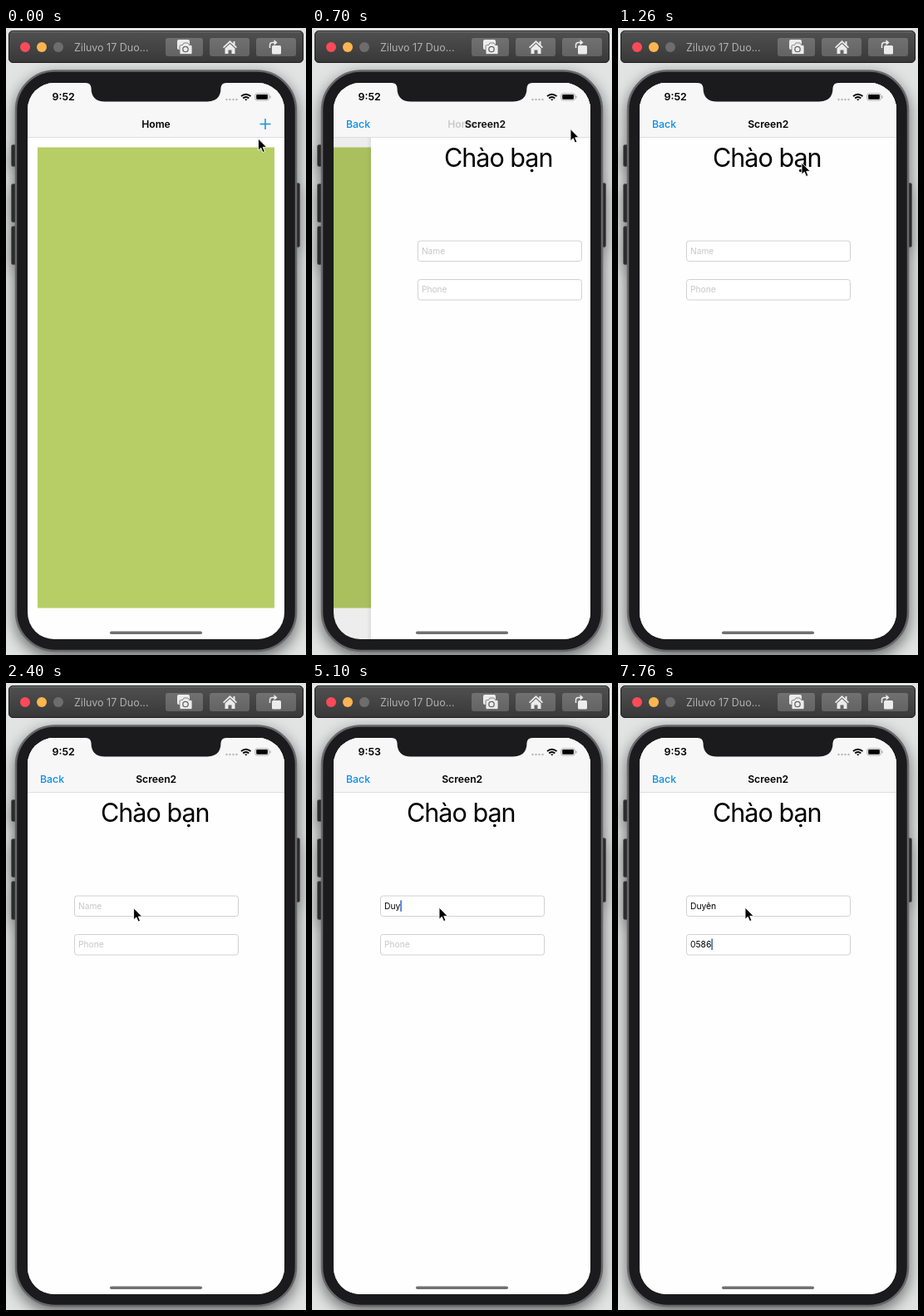
These frames come from a looping animation (361x754 px, 8000 ms). An HTML page:

```html
<!DOCTYPE html>
<html lang="vi">
<head>
<meta charset="utf-8">
<title>Screen push and form typing</title>
<style>
  html, body { margin: 0; width: 100%; height: 100%; overflow: hidden; background: #e2e4e4; }
  svg { display: block; width: 361px; height: 754px; font-family: Inter, Roboto, sans-serif; }
  .phone { filter: drop-shadow(0 6px 9px rgba(0, 0, 0, .55)); }
  .side { fill: #2b2b2d; stroke: #58585a; }
  .bar { font-size: 12.2px; font-weight: 600; }
  .back { font-size: 12.3px; font-weight: 500; fill: #0a8fea; }
  .hello { font-size: 30.5px; letter-spacing: -.032em; }
  .field { fill: #fff; stroke: #d0d0d0; }
  .input { font-size: 10.3px; }
  .hint { font-size: 10.2px; fill: #c6c6c8; }
  .icon { fill: #ececec; }
</style>
</head>
<body>
<svg viewBox="0 0 361 754">
  <defs>
    <linearGradient id="toolbar" x2="0" y2="1">
      <stop stop-color="#505050"/><stop offset="1" stop-color="#383838"/>
    </linearGradient>
    <linearGradient id="button" x2="0" y2="1">
      <stop stop-color="#717171"/><stop offset="1" stop-color="#636363"/>
    </linearGradient>
    <linearGradient id="edge">
      <stop stop-opacity="0"/><stop offset="1" stop-opacity=".07"/>
    </linearGradient>
    <clipPath id="screen"><rect x="26" y="66" width="309" height="669" rx="32"/></clipPath>
  </defs>

  <!-- phone body -->
  <g class="phone">
    <rect class="side" x="6.5" y="140.5" width="8" height="26" rx="2"/>
    <rect class="side" x="6.5" y="187.5" width="8" height="46" rx="2"/>
    <rect class="side" x="6.5" y="238.5" width="8" height="46" rx="2"/>
    <rect class="side" x="345.5" y="186.5" width="8" height="77" rx="2"/>
    <rect x="12" y="51.500" width="337" height="697.500" rx="47" fill="#1b1b1d" stroke="#68686a" stroke-width="2.500"/>
  </g>

  <!-- simulator toolbar -->
  <rect x="3.500" y="3.500" width="354" height="38" rx="4.500" fill="url(#toolbar)" stroke="#1c1c1c"/>
  <path d="M7 4.500H354" stroke="#777"/>
  <circle cx="23" cy="23" r="6" fill="#fd4a58"/>
  <circle cx="43" cy="23" r="6" fill="#fdb550"/>
  <circle cx="63" cy="23" r="6" fill="#6d6d6d"/>
  <text x="82" y="27.500" font-size="12.5" fill="#b0b0b0">Ziluvo 17 Duo...</text>
  <g fill="url(#button)">
    <rect x="192" y="12" width="45" height="22" rx="3"/>
    <rect x="245" y="12" width="48" height="22" rx="3"/>
    <rect x="301" y="12" width="48" height="22" rx="3"/>
  </g>
  <g class="icon">
    <rect x="206" y="14" width="15" height="12" rx="2"/>
    <path d="M210.500 20.500h2l1.500-2.500h5l1.500 2.500h2q1.500 0 1.500 1.500v8q0 1.500-1.500 1.500h-12q-1.500 0-1.500-1.500v-8q0-1.500 1.500-1.500z" stroke="#6a6a6a" stroke-width=".8"/>
    <circle cx="216" cy="25.500" r="3.200" fill="none" stroke="#666" stroke-width="1.300"/>
    <path d="M269.500 15L261 23l1.200 1.200 7.300-6.800 7.300 6.800L278 23l-2.500-2.400V16h-2v2.700z"/>
    <path d="M263.500 24.500l6-5.500 6 5.500V31h-4v-4.500h-4V31h-4z"/>
    <rect x="320" y="21" width="11" height="10.500" rx="1.500"/>
    <path d="M317.500 24v-3.500q0-3 3-3h3" fill="none" stroke="#ececec" stroke-width="1.500"/>
    <path d="M322.500 14l4 3.500-4 3.500z"/>
  </g>

  <!-- app -->
  <g clip-path="url(#screen)">
    <rect x="26" y="66" width="309" height="669" fill="#fefefe"/>
    <g id="home"><rect x="38" y="143.500" width="285" height="554" fill="#b6ce65"/></g>
    <rect id="dim" x="26" y="66" width="309" height="669"/>
    <g id="form">
      <rect x="21" y="66" width="5" height="669" fill="url(#edge)"/>
      <rect x="26" y="66" width="309" height="669" fill="#fefefe"/>
      <text class="hello" x="114" y="167">Chào bạn</text>
      <rect class="field" x="82.500" y="256" width="197" height="24.500" rx="3"/>
      <rect class="field" x="82.500" y="302.500" width="197" height="24.500" rx="3"/>
      <text class="hint" id="nameHint" x="87" y="272">Name</text>
      <text class="hint" id="phoneHint" x="87" y="318">Phone</text>
      <text class="input" id="name" x="87" y="272"></text>
      <text class="input" id="phone" x="87" y="318"></text>
      <rect id="caret" width="1.500" height="13.500" fill="#2f62cf"/>
    </g>
    <rect x="26" y="66" width="309" height="65" fill="#f7f7f7"/>
    <path d="M26 131.500H335" stroke="#dedede"/>
    <text class="bar" id="homeTitle" x="180.500" y="119.700" text-anchor="middle">Home</text>
    <text class="bar" id="formTitle" x="180.700" y="119.700" text-anchor="middle">Screen2</text>
    <text class="back" id="back" x="41" y="119.700">Back</text>
    <path id="plus" d="M305.500 115.500h13M312 109v13" stroke="#1592de" stroke-width="1.500"/>
    <text id="clock" x="55.500" y="87.300" font-size="12.4" font-weight="600"></text>
    <path d="M265.500 86h13" stroke="#b8b8ba" stroke-width="2.400" stroke-linecap="round" stroke-dasharray="0 4"/>
    <g fill="none" stroke="#000" stroke-width="1.900">
      <path d="M283 82q5.500-4.600 11.500 0M285.200 84.500q3.500-2.800 7.100 0"/>
      <path d="M287 85.500h3.600l-1.800 2z" fill="#000" stroke="none"/>
    </g>
    <rect x="299.800" y="78.800" width="16.500" height="8.200" rx="2.300" fill="none" stroke="#9a9a9a" stroke-width=".8"/>
    <rect x="301.200" y="80.100" width="13.700" height="5.600" rx="1.200"/>
    <path d="M318 81.500v3" stroke="#9a9a9a"/>
    <rect x="125" y="725.500" width="111" height="3.400" rx="1.700" fill="#707070"/>
  </g>
  <path d="M96 65H265V66Q259 66 258.500 72Q258.500 88.500 242 88.500H119Q102.500 88.500 102.500 72Q102 66 96 66z" fill="#1b1b1d"/>

  <path id="pointer" d="M0 0V14.200L3.300 11.200L5.500 16.500L7.900 15.500L5.700 10.300H10.200z" stroke="#fff" stroke-width=".9"/>
</svg>
<script>
  const LOOP = 8000;
  const WIDTH = 309;
  const PUSH_START = 505;
  const STIFFNESS = .0175;

  const pointerX = [[0, 303.5], [30, 304], [200, 311], [960, 311], [1060, 292], [1160, 258],
    [1260, 221], [1330, 192], [1500, 168], [1660, 157], [1830, 153], [2000, 153], [2160, 154], [2360, 154], [2460, 153]];
  const pointerY = [[0, 133], [30, 132], [200, 121.5], [960, 121.5], [1060, 131], [1160, 147],
    [1260, 162], [1330, 171], [1500, 222], [1660, 258], [1830, 271], [2160, 272], [2360, 271], [2460, 270]];
  const caretAlpha = [[2400, 0], [2430, 1], [3000, 1], [3230, 0], [3500, 0], [3660, 1], [4100, 1],
    [4330, 0], [4400, 0], [4430, 1], [6370, 1], [6530, 0], [6870, 0], [7030, 1]];
  const nameTyping = [[0, ''], [3660, 'd'], [4430, ''], [4700, 'D'], [4900, 'Du'], [5100, 'Duy'],
    [5300, 'Duye'], [5400, 'Duyê'], [5500, 'Duyên']];
  const phoneTyping = [[0, ''], [7030, '0'], [7200, '05'], [7460, '058'], [7760, '0586']];

  const el = id => document.getElementById(id);
  const clamp = v => Math.max(0, Math.min(1, v));
  const step = (list, t) => list.filter(([time]) => time <= t).pop()[1];
  const shift = (id, x, y = 0) => el(id).setAttribute('transform', `translate(${x} ${y})`);
  const fade = (id, alpha) => el(id).setAttribute('opacity', clamp(alpha));

  function track(points, t) {
    const next = points.findIndex(([time]) => time > t);
    if (next === 0) return points[0][1];
    if (next < 0) return points[points.length - 1][1];
    const [t0, a] = points[next - 1], [t1, b] = points[next];
    return a + (b - a) * (t - t0) / (t1 - t0);
  }

  // Critically damped spring, 0 to 1
  function pushProgress(t) {
    const s = Math.max(0, t - PUSH_START) * STIFFNESS;
    return 1 - (1 + s) * Math.exp(-s);
  }

  function drawPush(t) {
    const p = pushProgress(t);
    const rest = WIDTH * (1 - p);
    shift('home', -.3 * WIDTH * p);
    shift('form', p ? rest : WIDTH + 10);
    shift('formTitle', .62 * rest);
    fade('dim', .08 * p);
    fade('homeTitle', 1 - (p - .2) / .8);
    fade('formTitle', p ? p * 1.02 + .08 : 0);
    fade('back', (p - .1) / .7);
    fade('plus', t < 360 ? 1 : .35 - p * 1.2);
  }

  function drawForm(t) {
    const name = step(nameTyping, t), phone = step(phoneTyping, t);
    el('name').textContent = name;
    el('phone').textContent = phone;
    fade('nameHint', name ? 0 : 1);
    fade('phoneHint', phone ? 0 : 1);
    const onPhone = t >= 5800;
    const text = onPhone ? phone : name;
    const end = text ? el(onPhone ? 'phone' : 'name').getComputedTextLength() : 0;
    shift('caret', 87 + end, onPhone ? 307.5 : 261.3);
    fade('caret', track(caretAlpha, t));
  }

  function snap(t) {
    const frame = Math.floor((t + 7) * .03);
    return Math.floor(frame * 10 / 3) * 10;
  }

  function draw() {
    const t = snap(performance.now() % LOOP);
    drawPush(t);
    drawForm(t);
    el('clock').textContent = t < 3800 ? '9:52' : '9:53';
    shift('pointer', track(pointerX, t), track(pointerY, t));
    requestAnimationFrame(draw);
  }
  draw();
</script>
</body>
</html>
```
